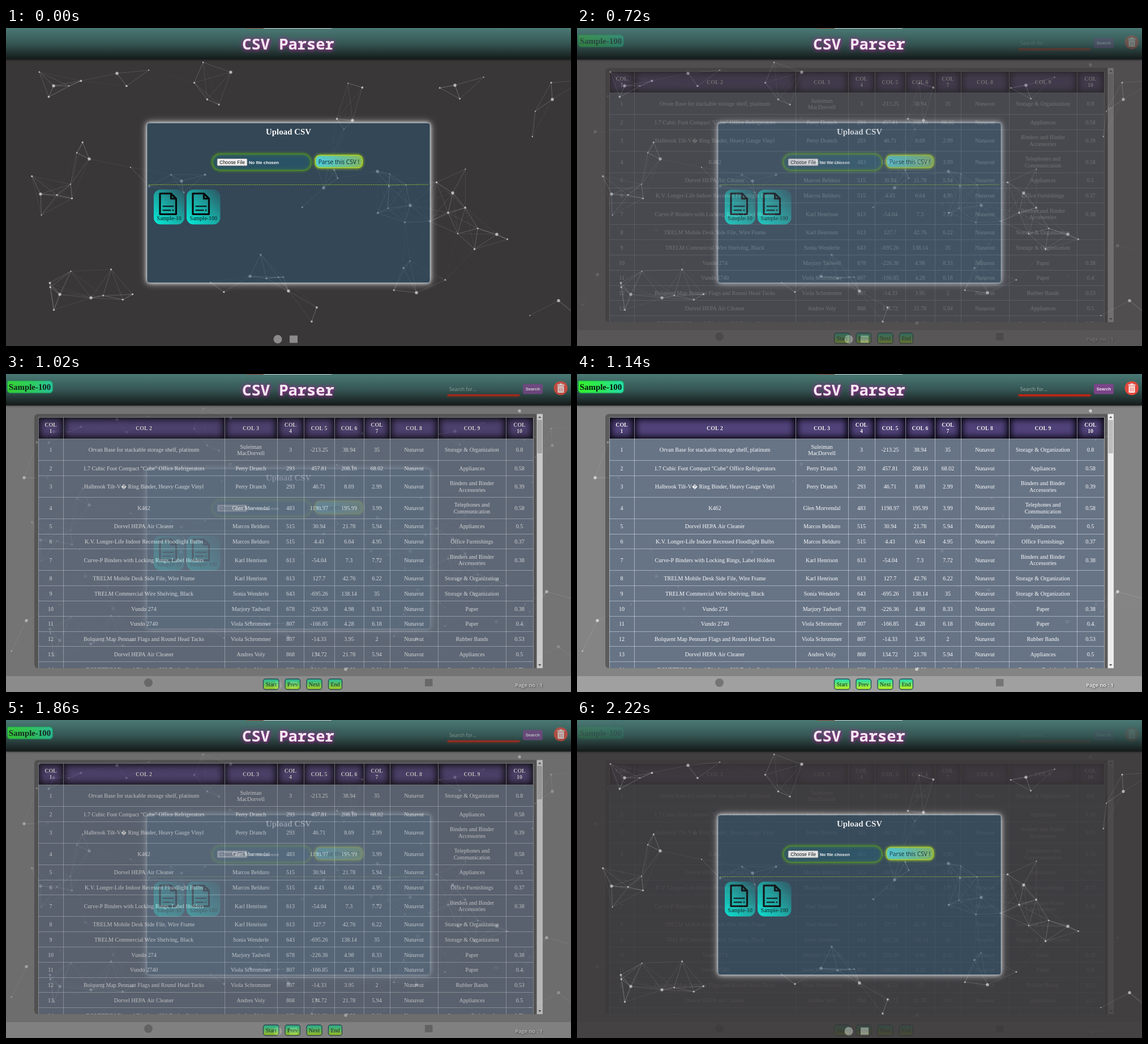
Write an HTML page with a canvas that moves like this. It is 998 px wide and 561 px high and loops after 2.28 s.

```html
<!DOCTYPE html>
<html lang="en">
<head>
<meta charset="utf-8">
<title>CSV Parser</title>
<style>
html, body { margin: 0; width: 100%; height: 100%; overflow: hidden; background: #3a3838; }
canvas { display: block; width: 100%; height: 100%; }
</style>
</head>
<body>
<canvas id="stage" width="998" height="561"></canvas>
<script>
const W = 998, H = 561;
const SERIF = '"Liberation Serif", serif';
const SANS = '"Liberation Sans", sans-serif';
const HUMAN = '"Open Sans", sans-serif';
const MONO = '"Noto Sans Mono", monospace';
let g;

function makePage(draw) {
  const page = document.createElement('canvas');
  page.width = W;
  page.height = H;
  g = page.getContext('2d');
  draw();
  return page;
}

// y is the middle of the capitals
function text(str, x, y, size, { family = SERIF, weight = '', color = '#fafafa', align = 'center' } = {}) {
  g.font = `${weight} ${size}px ${family}`;
  g.textAlign = align;
  g.fillStyle = color;
  g.fillText(str, x, y + size * (family === SERIF ? 0.33 : 0.357));
}

function lines(str, x, y, size, opts) {
  const parts = str.split('|');
  parts.forEach((p, i) => text(p, x, y + (i - (parts.length - 1) / 2) * 11.2, size, opts));
}

function glow(color, blur, draw, dx = 0, dy = 0) {
  g.save();
  Object.assign(g, { shadowColor: color, shadowBlur: blur, shadowOffsetX: dx, shadowOffsetY: dy });
  draw();
  g.restore();
}

function box(x, y, w, h, r, fill, stroke, width = 1) {
  g.beginPath();
  g.roundRect(x, y, w, h, r);
  if (fill) { g.fillStyle = fill; g.fill(); }
  if (stroke) { g.strokeStyle = stroke; g.lineWidth = width; g.stroke(); }
}

function disc(x, y, r, fill) {
  g.beginPath();
  g.arc(x, y, r, 0, 7);
  g.fillStyle = fill;
  g.fill();
}

function path(points, color, width) {
  g.beginPath();
  points.forEach(([x, y]) => g.lineTo(x, y));
  g.strokeStyle = color;
  g.lineWidth = width;
  g.stroke();
}

function gradient(x0, y0, x1, y1, ...colors) {
  const grad = g.createLinearGradient(x0, y0, x1, y1);
  colors.forEach((c, i) => grad.addColorStop(i / (colors.length - 1), c));
  return grad;
}

function seeded(seed) {
  return () => (seed = (seed * 16807) % 2147483647) / 2147483647;
}

// Every hub gets a few small dots around it; near pairs are joined, fainter with distance.
function network(hubs, satellites, seed) {
  const rand = seeded(seed), reach = 90;
  const dots = [];
  for (const [x, y] of hubs) {
    dots.push([x, y, 2.7]);
    for (let i = 0; i < satellites; i++) {
      const a = rand() * Math.PI * 2, d = 20 + rand() * 55;
      const u = x + d * Math.cos(a), v = y + d * Math.sin(a);
      if (v > 56 && v < 525) dots.push([u, v, 1 + rand()]);
    }
  }
  dots.forEach(([x, y], i) => {
    for (const [u, v] of dots.slice(i + 1)) {
      const d = Math.hypot(u - x, v - y);
      if (d < reach) path([[x, y], [u, v]], `rgba(255,255,255,${0.5 * (1 - d / reach)})`, 0.7);
    }
  });
  for (const [x, y, r] of dots) disc(x, y, r, 'rgba(255,255,255,.6)');
}

function header() {
  g.fillStyle = gradient(0, 0, 0, 55, '#4a7975', '#355653', '#151a1a');
  glow('rgba(0,0,0,.6)', 4, () => g.fillRect(0, 0, W, 55.5));
  g.fillStyle = '#8a5238';
  g.fillRect(424, 0, 31, 1);
  g.fillStyle = '#c9d2d0';
  g.fillRect(455, 0, 120, 1);
  const title = () => text('CSV Parser', 498.5, 28.3, 27.1, { family: MONO, weight: 'bold', color: '#f2e9f1' });
  glow('#a8289a', 9, title);
  glow('#8a2a80', 4, title, 1, 1);
}

function fileCard(x, w, label) {
  const ink = '#080b0c';
  box(x, 285, w, 61.5, 12, gradient(x, 346, x + w, 288, '#04ecd8', '#1aa7a2', '#2c5764'));
  const l = x + 11, r = x + 39.5;
  g.lineJoin = g.lineCap = 'round';
  path([[r - 9, 292], [l, 292], [l, 328.5], [r, 328.5], [r, 301], [r - 9, 292], [r - 9, 301], [r, 301]], ink, 3.2);
  path([[l + 5.5, 314.5], [r - 5, 314.5]], ink, 2.2);
  path([[l + 5.5, 321.5], [r - 10, 321.5]], ink, 2.2);
  disc(r - 5.5, 321.5, 1.3, ink);
  g.lineJoin = 'miter';
  g.lineCap = 'butt';
  text(label, x + w / 2, 335.5, 10, { color: '#0b1b1e' });
}

function uploadPage() {
  g.fillStyle = '#3a3738';
  g.fillRect(0, 0, W, H);
  network([
    [84, 102], [196, 80], [147, 231], [61, 293], [95, 470], [150, 476], [397, 78], [310, 270],
    [612, 163], [561, 282], [656, 253], [714, 313], [431, 438], [499, 464], [793, 101], [965, 126],
    [789, 291], [867, 364], [976, 481], [725, 467]], 4, 77);

  // Panel: outer glow only, so the dots stay visible inside
  const panel = [249, 167.5, 500, 282, 4];
  g.save();
  g.beginPath();
  g.rect(0, 0, W, H);
  g.roundRect(...panel);
  g.clip('evenodd');
  for (const blur of [14, 6]) glow('rgba(255,255,255,.75)', blur, () => box(...panel, '#b5b5b5'));
  g.restore();
  box(...panel, 'rgba(44,88,116,.5)', 'rgba(190,205,212,.55)', 1);

  text('Upload CSV', 499, 183, 14.9, { weight: 'bold' });
  glow('#5da01c', 5, () => box(364.5, 222.5, 174, 28.5, 14.2, '#2a5265', '#4b8a2a', 1.5));
  box(373, 230.5, 53, 12.5, 1.5, '#efefef', '#767676', 0.7);
  text('Choose File', 399.5, 236.8, 8.4, { family: SANS, color: '#111' });
  text('No file chosen', 429, 236.8, 7.75, { family: SANS, weight: 'bold', align: 'left' });

  const fill = gradient(546, 0, 630, 0, '#4acfe4', '#62bfae', '#80b666');
  glow('#a4d01c', 5, () => box(546.5, 224.5, 83, 22, 8, fill, '#b0d028', 1.5));
  text('Parse this CSV !', 588, 236, 10.2, { family: HUMAN, color: '#10242a' });

  g.setLineDash([2, 1.3]);
  path([[252, 276.5], [746, 276.5]], '#94b62c', 1);
  g.setLineDash([]);
  fileCard(261, 54, 'Sample-10');
  fileCard(319, 59.5, 'Sample-100');

  disc(480, 549, 7.5, '#8c8b8b');
  box(501, 542.5, 14, 13, 0, '#8c8b8b');
  header();
}

const EDGES = [57, 101, 386, 479, 526, 580, 632, 678, 763, 883, 931];
const TOP = 76.5, HEAD = 38, TALL = 38, SHORT = 26.8;
const ROWS = `Orvan Base for stackable storage shelf, platinum;Suleiman|MacDorvell;3;-213.25;38.94;35;Storage & Organization;0.8
1.7 Cubic Foot Compact "Cube" Office Refrigerators;Perry Dranch;293;457.81;208.16;68.02;Appliances;0.58
Halbrook Tilt-V\uFFFD Ring Binder, Heavy Gauge Vinyl;Perry Dranch;293;46.71;8.69;2.99;Binders and Binder|Accessories;0.39
K462;Glen Morvendal;483;1198.97;195.99;3.99;Telephones and|Communication;0.58
Dorvel HEPA Air Cleaner;Marcos Belduro;515;30.94;21.78;5.94;Appliances;0.5
K.V. Longer-Life Indoor Recessed Floodlight Bulbs;Marcos Belduro;515;4.43;6.64;4.95;Office Furnishings;0.37
Curve-P Binders with Locking Rings, Label Holders;Karl Henrison;613;-54.04;7.3;7.72;Binders and Binder|Accessories;0.38
TRELM Mobile Desk Side File, Wire Frame;Karl Henrison;613;127.7;42.76;6.22;Storage & Organization;
TRELM Commercial Wire Shelving, Black;Sonia Wenderle;643;-695.26;138.14;35;Storage & Organization;
Vundo 274;Marjory Tadwell;678;-226.36;4.98;8.33;Paper;0.38
Vundo 2740;Viola Schrommer;807;-166.85;4.28;6.18;Paper;0.4
Bolquent Map Pennant Flags and Round Head Tacks;Viola Schrommer;807;-14.33;3.95;2;Rubber Bands;0.53
Dorvel HEPA Air Cleaner;Andres Voly;868;134.72;21.78;5.94;Appliances;0.5
DOVETRIM Framed Displays, 200 Desks, Smoke;Andres Voly;868;114.46;47.98;3.61;Computer Peripherals;0.71`
  .split('\n').map((row, i) => {
    const cells = row.split(';');
    cells.splice(6, 0, 'Nunavut');
    return [String(i + 1), ...cells];
  });

function headCell(x, w, i) {
  g.save();
  g.beginPath();
  g.rect(x, TOP, w, HEAD);
  g.clip();
  g.fillStyle = '#51437a';
  g.fillRect(x, TOP, w, HEAD);
  // inset shadow cast by a frame around the cell
  glow('#06040c', 14, () => {
    g.beginPath();
    g.rect(x - 30, TOP - 30, w + 60, HEAD + 60);
    g.rect(x, TOP, w, HEAD);
    g.fillStyle = '#06040c';
    g.fill('evenodd');
    g.fill('evenodd');
  });
  g.restore();
  const gap = w < 50 ? '|' : ' ';
  glow('rgba(20,10,40,.7)', 2, () => lines(`COL${gap}${i + 1}`, x + w / 2, 95.3, 9.9, { weight: 'bold' }));
}

function table() {
  const rule = 'rgba(220,226,233,.55)';
  box(50, 70.5, 898, 448.5, 6, 'rgba(0,0,0,.3)');
  g.save();
  g.beginPath();
  g.rect(50, 70, 898, 449);
  g.clip();
  g.fillStyle = 'rgba(107,125,148,.75)';
  g.fillRect(57, TOP + HEAD, 874, 405);
  EDGES.slice(1).forEach((right, i) => headCell(EDGES[i], right - EDGES[i], i));
  for (const x of EDGES) path([[x + 0.5, TOP], [x + 0.5, 519]], rule, 1);
  path([[57, TOP], [931, TOP]], rule, 1);
  let y = TOP + HEAD;
  for (const row of ROWS) {
    const h = row.some(c => c.includes('|')) ? TALL : SHORT;
    const top = Math.floor(y) + 0.5;
    path([[57, top], [931, top]], rule, 1);
    row.forEach((c, i) => lines(c, (EDGES[i] + EDGES[i + 1]) / 2, y + h / 2 + 0.3, 10.05));
    y += h;
  }
  g.restore();

  g.fillStyle = '#ededed';
  g.fillRect(937.5, 70.5, 10.5, 448.5);
  g.fillStyle = '#bdbdbd';
  g.fillRect(938.5, 81, 8.5, 59);
  for (const [base, tip] of [[77.5, 74.5], [512, 515]]) {
    g.beginPath();
    g.moveTo(940, base);
    g.lineTo(945.5, base);
    g.lineTo(942.75, tip);
    g.fillStyle = '#505050';
    g.fill();
  }
}

function trashIcon() {
  const red = '#e2483d', white = '#fbeeee';
  disc(979.8, 25, 12.2, red);
  box(973.5, 18.5, 13, 2, 0.8, white);
  box(977.5, 16.8, 5, 2, 0.8, white);
  box(974.5, 21.5, 11, 11.5, [0, 0, 1.5, 1.5], white);
  for (const x of [977.3, 980, 982.7]) path([[x, 23.5], [x, 31]], red, 0.9);
}

function tablePage() {
  g.fillStyle = '#848484';
  g.fillRect(0, 0, W, H);
  g.fillStyle = '#a0a0a0';
  g.fillRect(0, 533, W, 28);
  network([
    [32, 183], [36, 435], [140, 357], [189, 414], [309, 314], [396, 159], [430, 439],
    [600, 521], [645, 312], [741, 284], [727, 381], [866, 437], [955, 384], [907, 65]], 2, 41);
  table();
  header();

  const tag = gradient(2, 0, 83, 0, '#35ee2c', '#2be85a', '#25dcae');
  box(2, 11.8, 80.8, 22, [2, 6, 6, 6], tag, '#1f8f58', 1.5);
  text('Sample-100', 42, 22.8, 14.9, { weight: 'bold', color: '#08160c' });

  text('Search for...', 783, 26.5, 8.6, { family: HUMAN, color: '#a3b0af', align: 'left' });
  glow('#c0200f', 3, () => box(779.5, 36, 128, 2.6, [0, 0, 5, 5], '#cc2412'), 0, 1);
  box(913, 17.5, 35, 18, 3, '#7a4488');
  text('Search', 930.5, 26.5, 7.7, { family: SANS, weight: 'bold', color: '#eee4f0' });
  trashIcon();

  disc(251.5, 544.5, 7.5, '#757575');
  box(740, 538, 13.5, 13, 0, '#757575');
  for (const [label, x, w] of [['Start', 454.5, 27.5], ['Prev', 493, 26.5], ['Next', 531, 27], ['End', 569.5, 24]]) {
    box(x, 538, w, 18.5, 4, gradient(0, 538, 0, 556, '#1fdcb8', '#68e66a', '#c0f01c'), '#24525a', 1.4);
    text(label, x + w / 2, 547.3, 10, { color: '#0c2420' });
  }
  glow('#333', 3, () => text('Page no : 1', 923.5, 548.5, 9.4, { family: HUMAN, weight: 600, color: '#f8f8f8' }), 1, 1);
}

const upload = makePage(uploadPage);
const result = makePage(tablePage);
const ctx = document.getElementById('stage').getContext('2d');

const HOLD = 600, STEP = 60, HALF = 1140;

function frame() {
  const t = performance.now() % (2 * HALF);
  const u = t % HALF;
  const fade = u < HOLD ? 0 : (Math.floor((u - HOLD) / STEP) + 1) / 10;
  const mix = t < HALF ? fade : 1 - fade;
  ctx.globalAlpha = 1;
  ctx.drawImage(upload, 0, 0);
  ctx.globalAlpha = mix;
  ctx.drawImage(result, 0, 0);
  requestAnimationFrame(frame);
}
frame();
</script>
</body>
</html>
```
